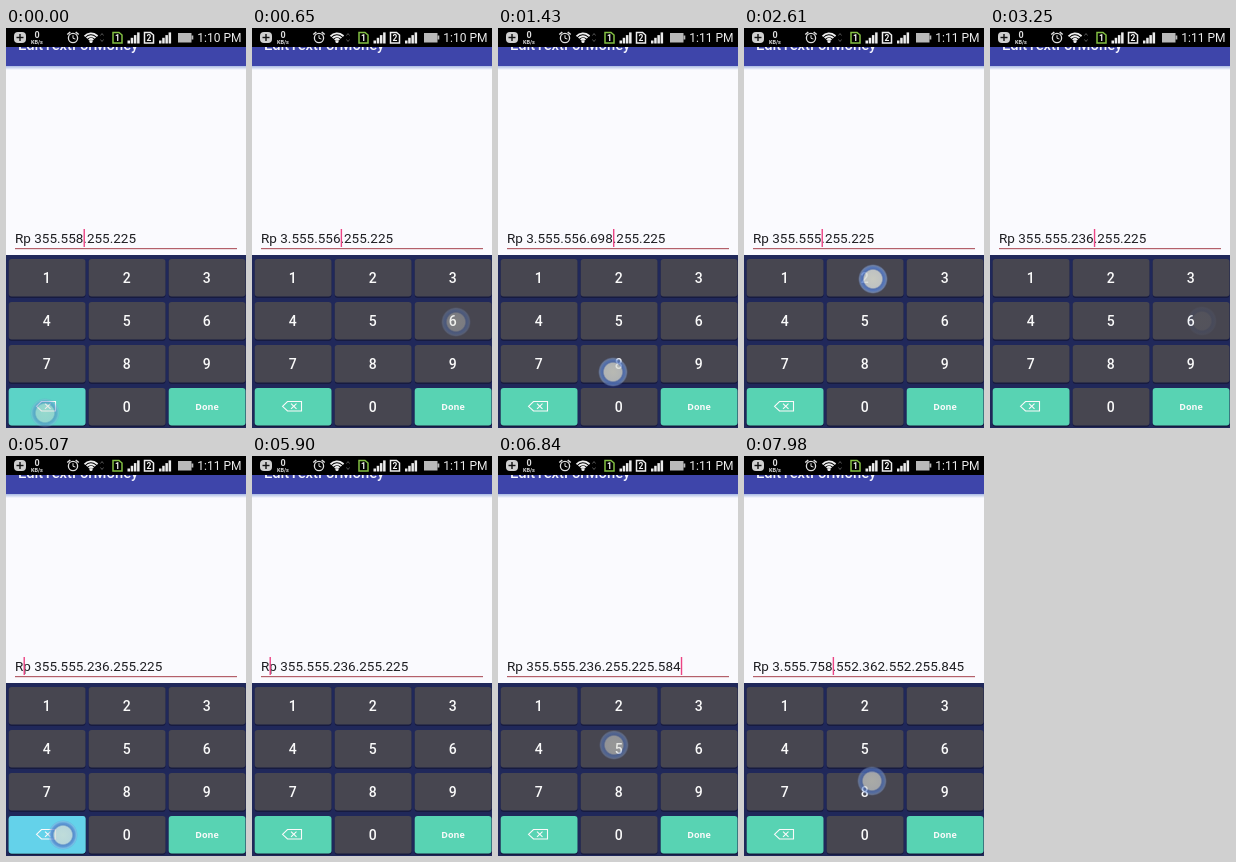
Write an HTML page with a canvas that moves like this. It is 240 px wide and 400 px high and loops after 8 s.

```html
<!DOCTYPE html>
<html>
<head>
<meta charset="utf-8">
<style>
html, body { margin: 0; width: 100%; height: 100%; overflow: hidden; background: #fafafe; }
canvas { display: block; width: 240px; height: 400px; }
</style>
</head>
<body>
<canvas id="stage" width="240" height="400"></canvas>
<script>
const g = document.getElementById('stage').getContext('2d');
const LOOP = 8000;
const SANS = 'Roboto, "Noto Sans", sans-serif';
const FIELD_FONT = '13.5px ' + SANS;
const CLOCK_TICK = 1000, HANDLE_ON = 3640, HANDLE_OFF = 4640;

// Each tap: release time, x, y, action. Digits type, '<' deletes, '@n' moves the caret.
const taps = [
  [65, 39, 385, '<'],
  [350, 119, 295, '5'], [600, 204, 294, '6'], [860, 202, 293, '6'],
  [1140, 200, 334, '9'], [1420, 115, 344, '8'],
  [1840, 42, 379, '<'], [2030, 43, 380, '<'], [2220, 41, 379, '<'], [2420, 40, 380, '<'],
  [2640, 129, 251, '2'], [2890, 212, 252, '3'], [3170, 212, 293, '6'],
  [3640, 20, 199, '@-1'],
  [4250, 60, 379, '<'], [4310, 64, 355, '<'], [4560, 60, 378, '<'], [4800, 58, 379, '<'],
  [5060, 57, 379, '<'], [5310, 56, 380, '<'], [5560, 57, 378, '<'], [5780, 55, 378, '<'],
  [6020, 212, 207, '@15'],
  [6240, 118, 291, '5'], [6450, 120, 334, '8'], [6660, 42, 293, '4'], [6900, 116, 289, '5'],
  [7140, 62, 211, '@4'],
  [7410, 42, 335, '7'], [7690, 119, 291, '5'], [7960, 128, 325, '8']
];

const clamp = v => Math.max(0, Math.min(1, v));

function fieldAt(t) {
  let digits = '355558255225', caret = 6;
  for (const [at, , , act] of taps) {
    if (at > t) break;
    if (act[0] === '@') caret = +act.slice(1);
    else if (act === '<') {
      if (caret > 0) {
        digits = digits.slice(0, caret - 1) + digits.slice(caret);
        caret--;
      }
    } else {
      digits = digits.slice(0, caret) + act + digits.slice(caret);
      caret++;
    }
  }
  return { digits, caret };
}

function rupiah({ digits, caret }) {
  let text = 'Rp ', before = 'R';
  for (let i = 0; i < digits.length; i++) {
    if (i && (digits.length - i) % 3 === 0) text += '.';
    text += digits[i];
    if (i + 1 === caret) before = text;
  }
  return { text, before };
}

function rect(x, y, w, h, color) {
  g.fillStyle = color;
  g.fillRect(x, y, w, h);
}

function roundRect(x, y, w, h, r, color) {
  g.fillStyle = color;
  g.beginPath();
  g.roundRect(x, y, w, h, r);
  g.fill();
}

function label(str, x, y, font, color, align = 'center') {
  g.font = font;
  g.fillStyle = color;
  g.textAlign = align;
  g.fillText(str, x, y);
}

function line(points, color, width = 1, close = false) {
  g.beginPath();
  points.forEach(([x, y]) => g.lineTo(x, y));
  if (close) g.closePath();
  g.strokeStyle = color;
  g.lineWidth = width;
  g.stroke();
}

function arc(x, y, r, from, to, color, width) {
  g.beginPath();
  g.arc(x, y, r, from, to);
  g.strokeStyle = color;
  g.lineWidth = width;
  g.stroke();
}

function bars(x) {
  for (let i = 0; i < 4; i++) {
    const h = 3 + i * 2.7;
    rect(x + i * 3.2, 15.5 - h, 2.5, h, '#ececec');
  }
}

function simCard(x, digit, edge) {
  line([[x, 4.5], [x + 6, 4.5], [x + 9, 7], [x + 9, 15], [x, 15]], edge, 1.5, true);
  label(digit, x + 4.5, 13.2, 'bold 8.5px ' + SANS, '#f4f4f4');
}

function statusBar(t) {
  const pale = '#dedede';
  rect(0, 0, 240, 19, '#000');

  roundRect(8, 4, 12, 11, 4, '#cfcfcf');
  rect(10.5, 8.8, 7, 1.4, '#111');
  rect(13.3, 6, 1.4, 7, '#111');

  label('0', 31, 10, 'bold 9px ' + SANS, pale);
  label('KB/s', 31, 16, 'bold 5.5px ' + SANS, pale);

  arc(67, 10, 4.6, 0, Math.PI * 2, pale, 1.3);
  line([[67, 7.2], [67, 10.3], [69.4, 11]], pale);
  line([[61.3, 6.5], [64.3, 4]], pale, 1.5);
  line([[69.7, 4], [72.7, 6.5]], pale, 1.5);

  for (const r of [3, 5.8, 8.6]) arc(85, 14, r, -Math.PI * .77, -Math.PI * .23, '#f0f0f0', 1.9);
  g.beginPath();
  g.arc(85, 13.5, 1.6, 0, Math.PI * 2);
  g.fillStyle = '#f0f0f0';
  g.fill();

  line([[94.5, 7.5], [96, 5.5], [97.5, 7.5]], '#555');
  line([[94.5, 11.5], [96, 13.5], [97.5, 11.5]], '#555');

  simCard(107, '1', '#83c043');
  bars(121.5);
  simCard(138.5, '2', '#eee');
  bars(153);

  rect(172, 5, 13.5, 9.5, '#b9b9b9');
  rect(185.5, 7.5, 1.8, 4, '#b9b9b9');
  label(t < CLOCK_TICK ? '1:10 PM' : '1:11 PM', 235.5, 14, '12px ' + SANS, '#ececec', 'right');
}

function appBar() {
  rect(0, 19, 240, 19, '#3e45aa');
  g.save();
  g.beginPath();
  g.rect(0, 19, 240, 18);
  g.clip();
  label('EditTextForMoney', 12, 22.3, '500 14.8px ' + SANS, '#f4f4ff', 'left');
  g.restore();
  const shade = g.createLinearGradient(0, 37.5, 0, 42);
  shade.addColorStop(0, '#9fb2e0');
  shade.addColorStop(1, '#fafafe');
  g.fillStyle = shade;
  g.fillRect(0, 38, 240, 4);
}

function field(t) {
  const { text, before } = rupiah(fieldAt(t));
  label(text, 9, 215, FIELD_FONT, '#1e1e22', 'left');
  const x = 9 + g.measureText(before).width;
  rect(9, 220, 222, 1.2, '#b4606a');
  rect(x + .2, 201, 1.4, 18, '#ec4484');
}

function handle() {
  g.fillStyle = '#f0506c';
  g.beginPath();
  g.moveTo(17.8, 220.5);
  g.lineTo(23, 225.5);
  g.arc(17.6, 229.7, 7.3, -.55, Math.PI + .55);
  g.closePath();
  g.fill();
}

function key(col, row, color) {
  const x = 2.7 + 80 * col, y = 231 + 43 * row;
  roundRect(x, y + 1, 76.8, 38, 3, '#171b40');
  roundRect(x, y, 76.8, 37.5, 3, color);
}

function keypad(pressed) {
  const white = '#fafafa';
  rect(0, 227, 240, 173, '#20285a');
  for (let n = 1; n <= 10; n++) {
    const col = n === 10 ? 1 : (n - 1) % 3;
    const row = Math.floor((n - 1) / 3);
    key(col, row, '#474650');
    label(String(n % 10), 40.8 + 80 * col, 255 + 43 * row, '500 14px ' + SANS, white);
  }
  key(0, 3, '#58d3b3');
  if (pressed) {
    g.globalAlpha = pressed;
    roundRect(2.7, 360, 76.8, 37.5, 3, '#68d2fb');
    g.globalAlpha = 1;
  }
  line([[30.5, 378.3], [35.5, 373.5], [49.5, 373.5], [49.5, 383], [35.5, 383]], white, 1.1, true);
  line([[39, 375.7], [44.5, 380.9]], white, 1.1);
  line([[44.5, 375.7], [39, 380.9]], white, 1.1);
  key(2, 3, '#58d3b3');
  label('Done', 201, 381.5, 'bold 9px "Open Sans", "Noto Sans", sans-serif', white);
}

function strength(t, at) {
  return Math.min(clamp((t - at + 90) / 50), clamp((at + 90 - t) / 90));
}

function touch(x, y, alpha) {
  const glow = g.createRadialGradient(x, y, 0, x, y, 15);
  glow.addColorStop(0, 'rgba(222,224,212,.85)');
  glow.addColorStop(.58, 'rgba(212,216,214,.85)');
  glow.addColorStop(.68, 'rgba(84,118,190,.85)');
  glow.addColorStop(.8, 'rgba(92,132,210,.8)');
  glow.addColorStop(.9, 'rgba(140,170,220,.55)');
  glow.addColorStop(1, 'rgba(90,120,200,0)');
  g.globalAlpha = alpha;
  g.fillStyle = glow;
  g.beginPath();
  g.arc(x, y, 15, 0, Math.PI * 2);
  g.fill();
  g.globalAlpha = 1;
}

function draw(t) {
  rect(0, 0, 240, 400, '#fafafe');
  appBar();
  statusBar(t);
  field(t);
  const live = taps.filter(([at]) => strength(t, at) > 0);
  const back = live.filter(tap => tap[3] === '<').map(([at]) => strength(t, at) ** 2);
  keypad(Math.max(0, ...back));
  if (t >= HANDLE_ON && t < HANDLE_OFF) handle();
  for (const [at, x, y] of live) touch(x, y, strength(t, at));
}

const start = performance.now();
function tick() {
  draw((performance.now() - start) % LOOP);
  requestAnimationFrame(tick);
}
tick();
</script>
</body>
</html>
```
